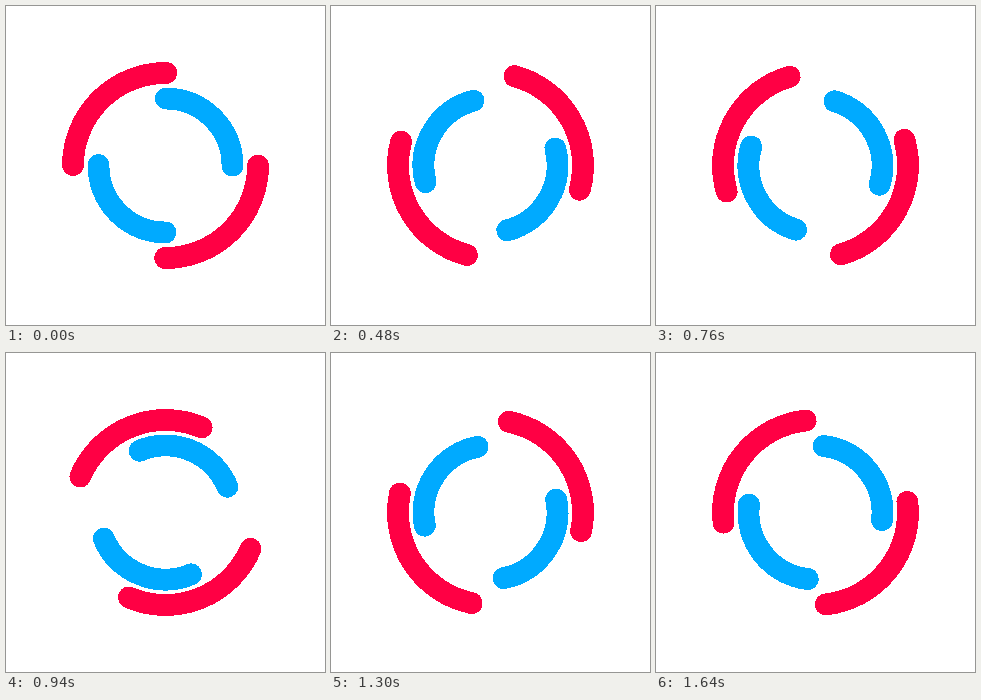
Animation of 319x319 px, one loop 1.67 s. Source, as an HTML page:

```html
<!DOCTYPE html>
<html lang="en">
<head>
<meta charset="utf-8">
<title>Double ring loader</title>
<style>
  html, body { margin: 0; width: 100%; height: 100%; overflow: hidden; background: #fff; }
  svg { display: block; width: 100vw; height: 100vh; }
  circle { fill: none; stroke-width: 6.85; stroke-linecap: round; shape-rendering: crispEdges; }
</style>
</head>
<body>
<svg viewBox="0 0 100 100">
  <circle id="outer" cx="50" cy="50" r="29" stroke="#ff0044"/>
  <circle id="inner" cx="50" cy="50" r="21" stroke="#00aaff"/>
</svg>
<script>
  const LOOP = 1670, STEPS = 55, RATE = 33;
  const outer = document.getElementById('outer');
  const inner = document.getElementById('inner');

  // two quarter arcs, separated by two quarter gaps
  function dash(ring, shift) {
    const quarter = ring.r.baseVal.value * Math.PI / 2;
    ring.setAttribute('stroke-dasharray', `${quarter} ${quarter}`);
    ring.setAttribute('stroke-dashoffset', quarter * shift);
  }

  // 33 steps per second, each starting on a whole 10 ms tick
  function stepAt(ms) {
    const tick = Math.floor((ms % LOOP) / 10) * 10;
    return Math.ceil((tick + 5) * RATE / 1000) - 1;
  }

  function draw(ms) {
    const angle = stepAt(ms) * 360 / STEPS;
    outer.setAttribute('transform', `rotate(${angle} 50 50)`);
    inner.setAttribute('transform', `rotate(${-angle} 50 50)`);
  }

  let start;
  function tick(now) {
    if (start === undefined) start = now;
    draw(Math.max(0, now - start));
    requestAnimationFrame(tick);
  }

  dash(outer, 0);
  dash(inner, 1);
  draw(0);
  requestAnimationFrame(tick);
</script>
</body>
</html>
```
